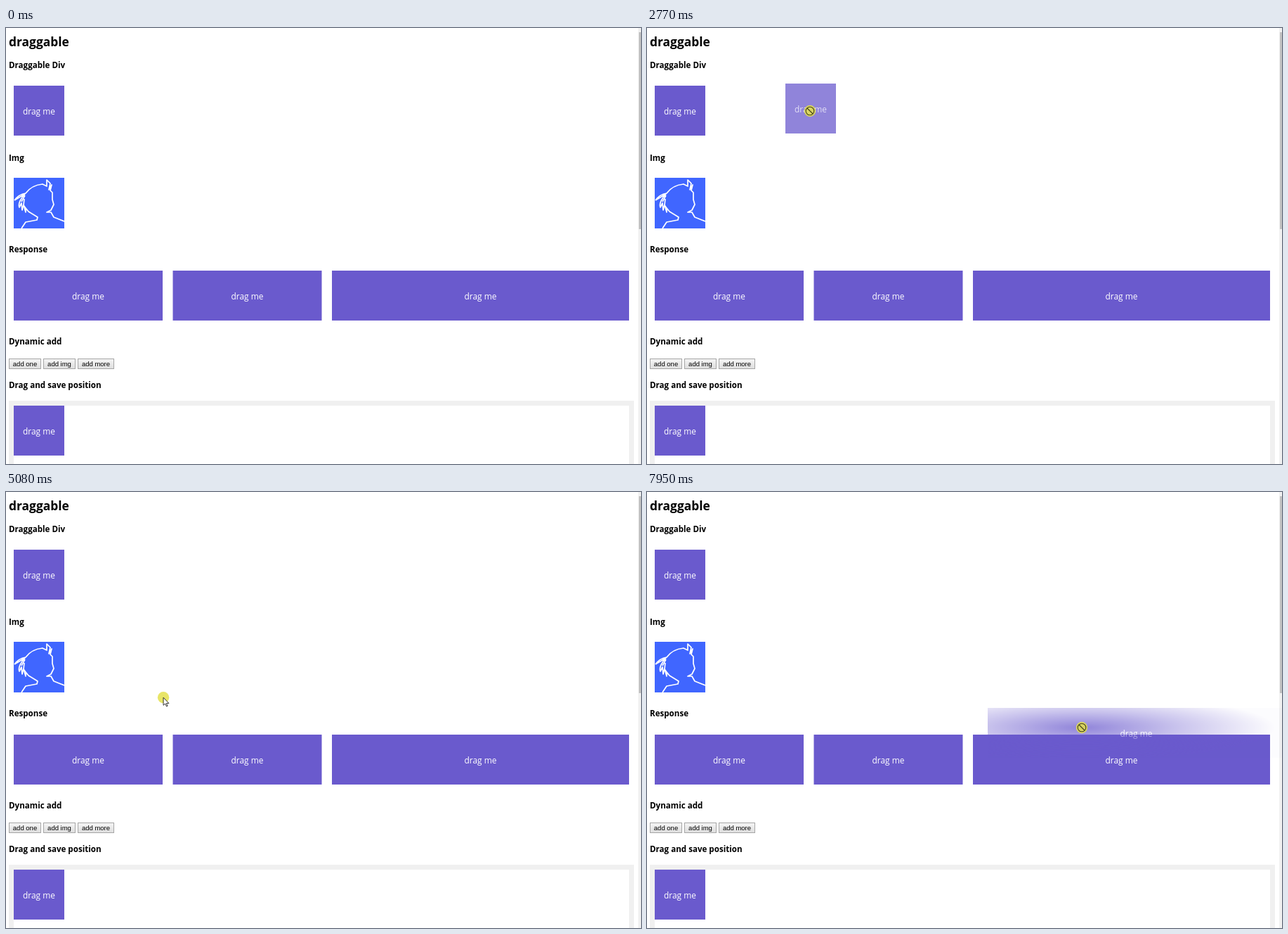
Write an HTML page with a canvas that moves like this. It is 904 by 620 pixels and loops after 8000 ms.

```html
<!DOCTYPE html>
<html lang="en">
<head>
<meta charset="utf-8">
<title>draggable</title>
<style>
  html, body { margin: 0; width: 100%; height: 100%; overflow: hidden; background: #fff; }
  canvas { display: block; }
</style>
</head>
<body>
<canvas id="stage" width="904" height="620"></canvas>
<script>
const stage = document.getElementById('stage');
const ctx = stage.getContext('2d');
const layer = document.createElement('canvas');
layer.width = stage.width;
layer.height = stage.height;
const layerCtx = layer.getContext('2d');

const LOOP = 8000, START = 210, STEP = 77.4, LAST = 100;
const SANS = '"Open Sans", "Noto Sans", sans-serif';
const PURPLE = '#6a5acd', BLUE = '#4066ff';

const box = (x, y, w) => ({ x, y, w, h: 71 });
const square = box(11, 82, 72);
const avatar = { x: 11, y: 213, w: 72, h: 72, img: true };
const wide1 = box(11, 345, 212);
const wide2 = box(237.5, 345, 212);
const wide3 = box(464, 345, 423);
const saved = box(11, 537, 72);
const items = [square, avatar, wide1, wide2, wide3, saved];

// Each drag runs through a few points [step, x, y]; the first is the grab point.
const ENTRY = [0, 840, 604];
const drags = [
  { item: square, path: [[19, 46, 121], [22, 135, 146], [23, 174, 117], [27, 297, 104],
    [30, 262, 144], [33, 232, 118], [37, 327, 118]] },
  { item: avatar, path: [[49, 51, 249], [53, 226, 155], [57, 371, 150], [62, 262, 250]] },
  { item: wide1, path: [[71, 157, 367], [75, 232, 244], [77, 219, 226], [78, 219, 226]] },
  { item: wide2, path: [[84, 302, 357], [89, 220, 226], [90, 220, 226]] },
  { item: wide3, path: [[98, 598, 373], [100, 619, 335]], fade: true }
];

const mix = (a, b, u) => a + (b - a) * u;
const easeOut = u => 1 - (1 - Math.min(1, u)) ** 3;

function slope(path, i, k) {
  const a = path[i], b = path[i + 1];
  return a && b ? (b[k] - a[k]) / (b[0] - a[0]) : 0;
}

// Monotone tangent: the curve never overshoots its points.
function tangent(path, i, k) {
  const a = slope(path, i - 1, k), b = slope(path, i, k);
  if (i === 0) return b;
  return a * b > 0 ? 2 * a * b / (a + b) : 0;
}

function along(path, n) {
  let i = 0;
  while (i < path.length - 2 && n >= path[i + 1][0]) i++;
  const p = path[i], q = path[i + 1], span = q[0] - p[0];
  const u = (n - p[0]) / span, v = 1 - u;
  return [1, 2].map(k =>
    v * v * (1 + 2 * u) * p[k] + u * u * (3 - 2 * u) * q[k] +
    span * u * v * (v * tangent(path, i, k) - u * tangent(path, i + 1, k)));
}

// Between drags the pointer glides to the next grab point and rests there.
function pointerAt(n) {
  let from = ENTRY;
  for (const drag of drags) {
    const grab = drag.path[0], end = drag.path.at(-1);
    if (n <= grab[0]) {
      const u = easeOut((n - from[0]) / (0.8 * (grab[0] - from[0])));
      return { pos: [1, 2].map(k => mix(from[k], grab[k], u)) };
    }
    if (n <= end[0]) return { pos: along(drag.path, n), drag };
    from = end;
  }
}

function rect(c, color, x, y, w, h) {
  c.fillStyle = color;
  c.fillRect(x, y, w, h);
}

function text(c, str, x, y, font, color = '#000', align = 'left') {
  c.font = font;
  c.fillStyle = color;
  c.textAlign = align;
  c.fillText(str, x, y);
}

const portrait = new Path2D(
  'M1 32 C6 25 11 23 17 22 C22 15 31 10 41 9 L47 12 L47 3 L52 8 L50 17 L54 10 L52 18' +
  'L55 21 L55 31 L57 38 L53 46 L47 49 L53 49 L57 56 L72 62' +
  'M1 32 L16 23 C10 29 6 37 8 42 L11 36 L12 46 L14 38 L17 49 L17 43' +
  'L21 48 L34 56 L33 60 L17 63 L11 72 M16 25 L11 34 M15 30 L14 39 L19 46');

function drawItem(c, it, x, y) {
  rect(c, it.img ? BLUE : PURPLE, x, y, it.w, it.h);
  if (it.img) {
    c.save();
    c.beginPath();
    c.rect(x, y, it.w, it.h);
    c.clip();
    c.translate(x, y);
    c.strokeStyle = '#fff';
    c.lineWidth = 1.7;
    c.lineJoin = 'round';
    c.stroke(portrait);
    c.restore();
  } else {
    text(c, 'drag me', x + it.w / 2, y + 40.5, '500 11.9px ' + SANS, '#fff', 'center');
  }
}

function button(label, x, w) {
  const g = ctx.createLinearGradient(0, 470, 0, 485);
  g.addColorStop(0, '#f6f6f6');
  g.addColorStop(1, '#ddd');
  rect(ctx, g, x, 470, w, 15);
  ctx.strokeStyle = '#a6a6a6';
  ctx.lineWidth = 1;
  ctx.strokeRect(x + 0.5, 470.5, w - 1, 14);
  text(ctx, label, x + w / 2, 480.5, '9.5px "Liberation Sans", Arial, sans-serif', '#000', 'center');
}

function drawPage() {
  rect(ctx, '#fff', 0, 0, 904, 620);
  rect(ctx, '#f1f1f1', 900, 0, 4, 620);
  rect(ctx, '#c1c1c1', 901, 6, 3, 280);
  rect(ctx, '#f0f0f0', 4, 530, 890, 90);
  rect(ctx, '#fff', 11, 537, 876, 83);

  text(ctx, 'draggable', 4, 26, 'bold 17.4px ' + SANS);
  const heads = ['Draggable Div', 'Img', 'Response', 'Dynamic add', 'Drag and save position'];
  const baselines = [57, 188.5, 319, 450, 511.5];
  heads.forEach((str, i) => text(ctx, str, 4, baselines[i], 'bold 11.6px ' + SANS));

  button('add one', 4, 46);
  button('add img', 53, 46);
  button('add more', 102, 52);
  for (const it of items) drawItem(ctx, it, it.x, it.y);
}

// Large drag images fade out around the pointer.
function drawFaded(it, x, y, px, py) {
  const c = layerCtx;
  c.clearRect(0, 0, 904, 620);
  drawItem(c, it, x, y);
  c.save();
  c.globalCompositeOperation = 'destination-in';
  c.translate(px, py);
  c.scale(275, 46);
  const g = c.createRadialGradient(0, 0, 0, 0, 0, 1);
  g.addColorStop(0, 'rgba(0,0,0,.74)');
  g.addColorStop(0.5, 'rgba(0,0,0,.36)');
  g.addColorStop(1, 'rgba(0,0,0,.02)');
  rect(c, g, -4, -14, 8, 28);
  c.restore();
  ctx.drawImage(layer, 0, 0);
}

function drawGhost({ item: it, path, fade }, px, py) {
  const [, gx, gy] = path[0];
  const x = Math.round(it.x + px - gx), y = Math.round(it.y + py - gy);
  if (fade) return drawFaded(it, x, y, px, py);
  ctx.globalAlpha = it.img ? 0.57 : 0.74;
  drawItem(ctx, it, x, y);
  ctx.globalAlpha = 1;
}

const arrow = new Path2D('M0 0 L0 11 L2.6 8.7 L4.4 12.6 L6 11.9 L4.3 8.1 L7.8 8.1 Z');

function drawPointer(x, y, dragging) {
  ctx.save();
  ctx.translate(x, y);
  ctx.beginPath();
  ctx.arc(0, 0, 8.2, 0, 2 * Math.PI);
  ctx.fillStyle = 'rgba(228,224,74,.84)';
  ctx.fill();
  if (dragging) {
    ctx.beginPath();
    ctx.arc(0, 0, 5.8, 0, 2 * Math.PI);
    ctx.moveTo(-4, -4);
    ctx.lineTo(4, 4);
    ctx.strokeStyle = '#44431a';
    ctx.lineWidth = 1.1;
    ctx.stroke();
  } else {
    ctx.fillStyle = '#fff';
    ctx.fill(arrow);
    ctx.strokeStyle = '#000';
    ctx.lineWidth = 0.8;
    ctx.stroke(arrow);
  }
  ctx.restore();
}

function render(t) {
  drawPage();
  if (t < START) return;
  const n = Math.min(LAST, Math.floor((t - START) / STEP + 0.15));
  const { pos, drag } = pointerAt(n);
  if (drag) drawGhost(drag, ...pos);
  drawPointer(...pos, drag);
}

const began = performance.now();
function tick() {
  render((performance.now() - began) % LOOP);
  requestAnimationFrame(tick);
}
tick();
</script>
</body>
</html>
```
